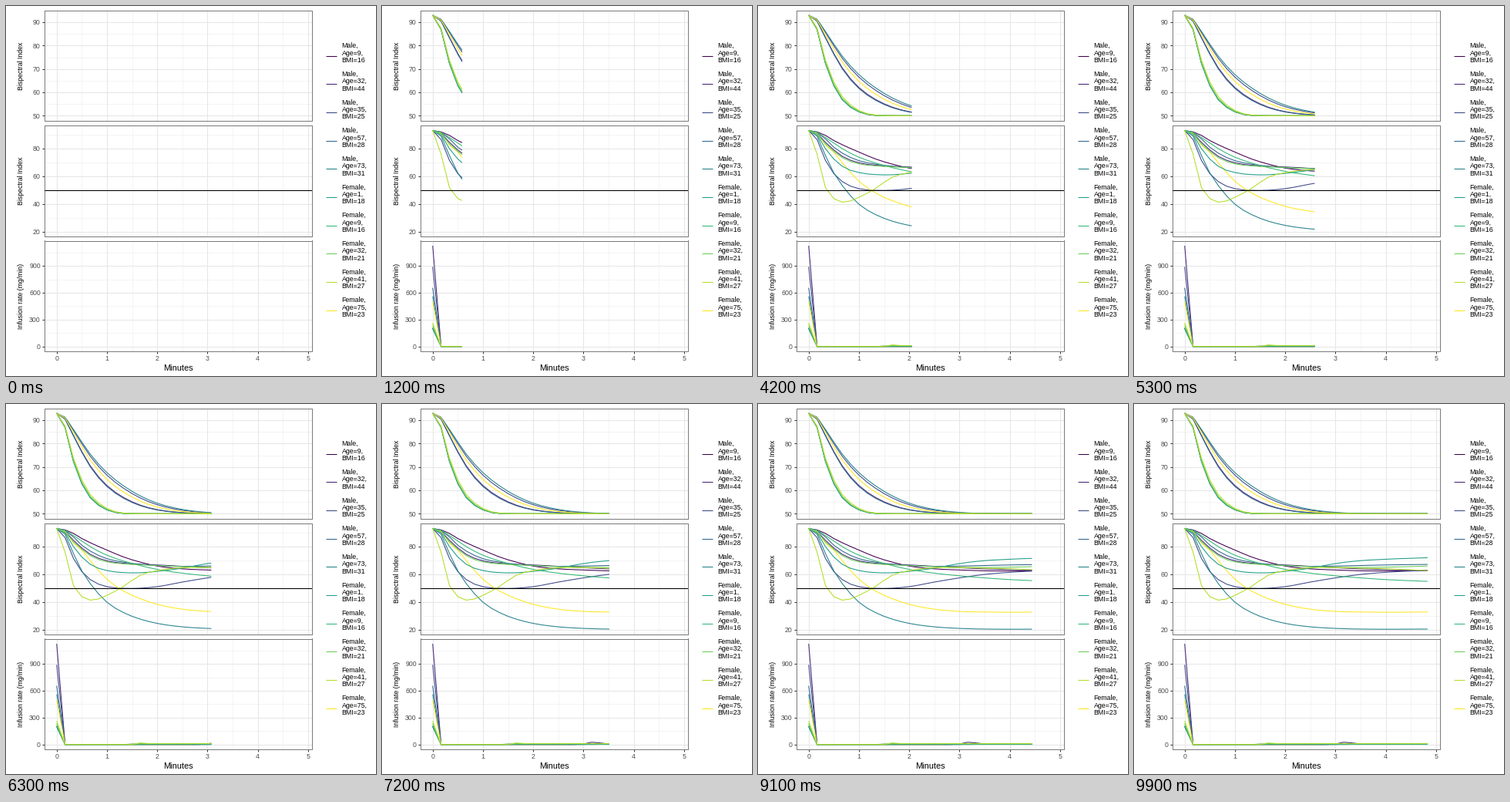
Recreate the animation shown at these times as a matplotlib script. Size 480 by 480 pixels, loop 10 s.

```python
import numpy as np
import matplotlib.pyplot as plt
from matplotlib.animation import FuncAnimation

plt.rcParams["font.family"] = "Liberation Sans"

SIZE, FRAMES, INTERVAL = 480, 100, 100
STEP, T_END = 1 / 6, 29 / 6
TIMES = np.arange(30) * STEP

PEOPLE = [("Male", 9, 16), ("Male", 32, 44), ("Male", 35, 25), ("Male", 57, 28),
          ("Male", 73, 31), ("Female", 1, 18), ("Female", 9, 16),
          ("Female", 32, 21), ("Female", 41, 27), ("Female", 75, 23)]
COLORS = ["#440154", "#482878", "#3E4A89", "#31688E", "#26828E",
          "#1F9E89", "#35B779", "#6DCD59", "#B4DE2C", "#FDE725"]
ORDER = [0, 1, 2, 3, 4, 9, 5, 6, 7, 8]


def smooth(knots, values):
    """Cubic Hermite curve through the knots, sampled once per step."""
    x, y = np.array(knots) * STEP, np.array(values, float)
    m = np.gradient(y, x)
    i = np.clip(np.searchsorted(x, TIMES, side="right") - 1, 0, len(x) - 2)
    h = x[i + 1] - x[i]
    u = (TIMES - x[i]) / h
    return ((1 + 2 * u) * (1 - u) ** 2 * y[i] + u * (1 - u) ** 2 * h * m[i]
            + u * u * (3 - 2 * u) * y[i + 1] + u * u * (u - 1) * h * m[i + 1])


# Controlled index: decay from 93 towards 50, at a personal speed
SLOW = smooth([0, 1, 2, 3, 4, 6, 9, 12, 15, 18, 21, 24, 29],
              [0, .041, .175, .337, .52, .894, 1.5, 2.25, 3.15, 4.3, 5.8, 7.5, 12])
FAST = smooth([0, 1, 2, 3, 4, 5, 6, 7, 8, 10, 29],
              [0, .15, .648, 1.197, 1.815, 2.453, 3.23, 4.27, 5.5, 8, 15])
SPEED = [(FAST, 1), (SLOW, 1.42), (SLOW, 1.07), (SLOW, 1.46), (SLOW, 1),
         (FAST, 1.01), (FAST, .99), (FAST, .97), (FAST, .91), (SLOW, 1.2)]
controlled = [50 + 43 * np.exp(-k * g) for g, k in SPEED]

# Uncontrolled index
KNOTS = [0, 1, 2, 3, 4, 6, 8, 10, 12, 15, 18, 21, 24, 29]
open_loop = [smooth(KNOTS, v) for v in (
    [93, 92, 89.5, 85.8, 82.8, 77.5, 72.5, 68.8, 66, 64, 63.2, 62.6, 62.5, 62.8],
    [93, 91, 84.5, 79, 74.5, 69.8, 68, 67.2, 66.8, 65.8, 64.8, 64, 63.5, 62.8],
    [93, 86.5, 71.5, 62, 56.3, 51.2, 50, 50.1, 51.2, 54.5, 57.5, 60, 61.5, 63],
    [93, 91.5, 87, 81, 76.8, 71.3, 68.8, 67.3, 66.3, 65.8, 66, 66.4, 66.8, 67.2],
    [93, 89, 75, 62.5, 53.5, 40, 32.5, 27.8, 24.8, 22.3, 21.2, 20.7, 20.6, 20.7],
    [93, 90, 80, 72.5, 67.3, 62.8, 61.3, 61.2, 62.2, 64.5, 67.8, 69.9, 70.9, 72],
    [93, 91.7, 88, 84, 80, 73.8, 69.6, 66.3, 63.6, 60.9, 59, 57.5, 56.3, 55],
    [93, 90.5, 83.5, 78, 73.5, 69, 67.6, 66.9, 66.4, 65.6, 65, 65, 65.2, 66],
    [93, 76, 52, 44, 41.5, 45, 51.5, 59.5, 62.7, 64.8, 65, 64.5, 64, 62.8],
    [93, 91, 82.5, 77.5, 70, 56.5, 48, 42.5, 38.5, 35, 33.4, 33, 32.8, 33])]

# Infusion: one bolus, a pause, then a low maintenance rate
BOLUS = [205, 1125, 890, 655, 560, 195, 215, 240, 262, 500]
MAINTAIN = [3, 6, 2, 4, 1, 2, 4, 9, 10, 5]
RESUME = [9, 18, 17, 19, 20, 10, 9, 10, 10, 17]
rates = []
for bolus, level, start in zip(BOLUS, MAINTAIN, RESUME):
    rate = np.where(np.arange(30) >= start, level, 0.0)
    rate[0] = bolus
    rates.append(rate)
rates[8][10] = 18
rates[1][19:21] = 25, 17

fig = plt.figure(figsize=(SIZE / 72, SIZE / 72), dpi=72, facecolor="white")


def label(x, y, text, size=8.8, color="black", **kw):
    fig.text(x / SIZE, 1 - y / SIZE, text, size=size, color=color,
             va="baseline", **kw)


LEFT, WIDTH, HEIGHT = 50, 346.6, 143.7


def panel(top, ylim, major, minor, title):
    ax = fig.add_axes([LEFT / SIZE, 1 - (top + HEIGHT) / SIZE,
                       WIDTH / SIZE, HEIGHT / SIZE])
    ax.set(xlim=(-.2417, 5.075), ylim=ylim)
    ax.set_axisbelow(True)
    ax.set_xticks(range(6))
    ax.set_xticks(np.arange(.5, 5), minor=True)
    ax.set_yticks(major)
    ax.set_yticks(minor, minor=True)
    ax.grid(which="major", color="#E6E6E6", lw=1.07)
    ax.grid(which="minor", color="#EBEBEB", lw=.53)
    ax.tick_params(which="both", length=0, labelleft=False, labelbottom=False)
    ax.tick_params(axis="y", which="major", length=2.75, width=1, color="#333333")
    ax.spines[:].set(color="#7A7A7A", lw=1)
    for v in major:
        y = top + HEIGHT * (ylim[1] - v) / (ylim[1] - ylim[0])
        label(44.8, y + 3.2, str(v), color="#4D4D4D", ha="right")
    label(22, top + HEIGHT / 2, title, rotation=90, ha="center",
          rotation_mode="anchor")
    return ax


axes = [
    panel(5.5, (47.75, 95.15), range(50, 91, 10), range(55, 90, 10),
          "Bispectral Index"),
    panel(155, (16.98, 96.62), range(20, 81, 20), range(30, 91, 20),
          "Bispectral Index"),
    panel(304.5, (-56.25, 1181.25), range(0, 901, 300), range(150, 1051, 300),
          "Infusion rate (mg/min)")]
axes[1].axhline(50, color="black", lw=1.07, zorder=5)
axes[2].tick_params(axis="x", which="major", length=2.75, width=1, color="#333333")
for v in range(6):
    label(65.7 + 65.19 * v, 460.3, str(v), color="#4D4D4D", ha="center")
label(223.3, 473, "Minutes", size=11, ha="center")

for i, (sex, age, bmi) in enumerate(PEOPLE):
    y = 64.7 + 36.65 * i
    fig.add_artist(plt.Line2D([415 / SIZE, 428.8 / SIZE], [1 - y / SIZE] * 2,
                              color=COLORS[i], lw=1.07, solid_capstyle="butt"))
    for j, text in enumerate((f"{sex},", f"Age={age},", f"BMI={bmi}")):
        label(435.7, y - 10.5 + 9.5 * j, text)

curves = []
for ax, data in zip(axes, (controlled, open_loop, rates)):
    for i in ORDER:
        line, = ax.plot([], [], color=COLORS[i], lw=1.07, solid_capstyle="butt")
        curves.append((line, data[i]))


def draw(frame):
    now = T_END * frame / (FRAMES - 1)
    t = np.append(TIMES[TIMES < now], now)
    for line, values in curves:
        line.set_data(t, np.interp(t, TIMES, values))
    return [line for line, _ in curves]


anim = FuncAnimation(fig, draw, frames=FRAMES, interval=INTERVAL,
                     repeat=True, repeat_delay=0)
plt.show()
```
